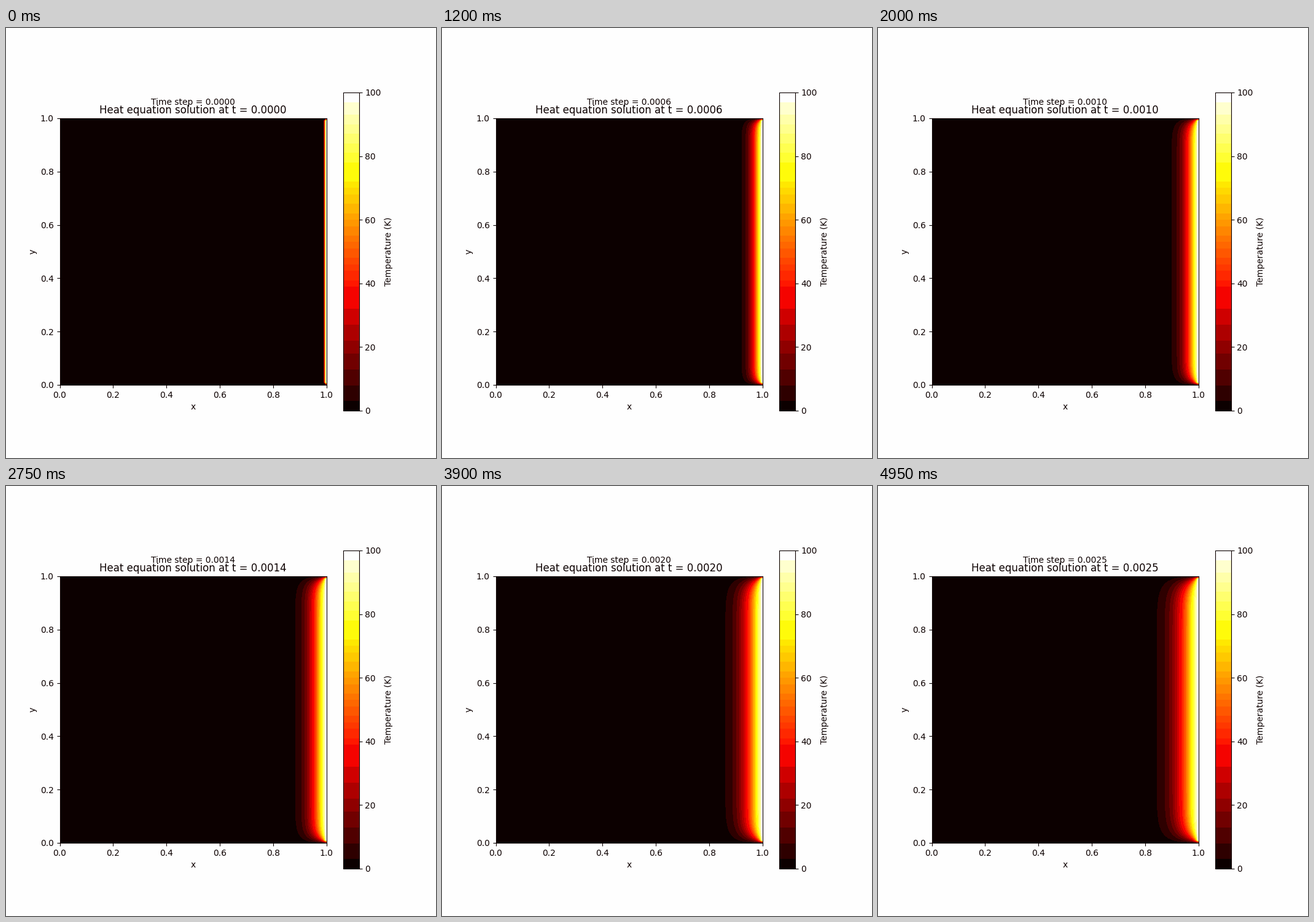
Recreate the animation shown at these times as a matplotlib script. Size 700 by 700 pixels, loop 5 s.

```python
import numpy as np
import matplotlib.pyplot as plt
from matplotlib.animation import FuncAnimation
from matplotlib.colors import BoundaryNorm, ListedColormap

FRAMES, INTERVAL = 100, 50
POINTS = 100
INK = (12 / 255, 0, 0)
PAPER = (254 / 255,) * 3

plt.rcParams.update({
    "font.family": "DejaVu Sans",
    "text.color": INK,
    "axes.labelcolor": INK,
    "axes.edgecolor": INK,
    "xtick.color": INK,
    "ytick.color": INK,
    "figure.facecolor": PAPER,
    "savefig.facecolor": PAPER,
    "axes.facecolor": PAPER,
})


def hot_bands():
    """Group one-kelvin steps of the hot map into coarse colour bands."""
    steps = (np.arange(100) + 0.5) / 100
    rgb = np.rint(plt.get_cmap("hot")(steps)[:, :3] * 255)
    bins = rgb // (32, 16, 32)
    cuts = np.flatnonzero(np.any(np.diff(bins, axis=0) != 0, axis=1)) + 1
    colors = [np.floor(g.mean(axis=0)) / 255 for g in np.split(rgb, cuts)]
    colors[0], colors[-1] = INK, PAPER
    return np.r_[0, cuts, 100], ListedColormap(colors)


def solve(dx, dt):
    """Explicit heat equation: right edge at 100 K, other edges at 0 K."""
    u = np.zeros((POINTS, POINTS))
    u[1:-1, -1] = 100
    states = [u]
    for _ in range(FRAMES - 1):
        new = u.copy()
        new[1:-1, 1:-1] += dt / dx**2 * (
            u[2:, 1:-1] + u[:-2, 1:-1] + u[1:-1, 2:] + u[1:-1, :-2]
            - 4 * u[1:-1, 1:-1])
        states.append(new)
        u = new
    return states


grid = np.linspace(0, 1, POINTS)
dx = grid[1]
dt = dx**2 / 4
states = solve(dx, dt)
levels, cmap = hot_bands()
norm = BoundaryNorm(levels, cmap.N)

fig, ax = plt.subplots(figsize=(7, 7), dpi=100)
fig.subplots_adjust(top=0.85)


def draw_field(n):
    return ax.contourf(grid, grid, states[n], levels=levels, cmap=cmap, norm=norm)


field = draw_field(0)
bar = fig.colorbar(field, ax=ax, spacing="proportional", ticks=range(0, 101, 20))
bar.minorticks_off()
bar.set_label("Temperature (K)")
ax.set_aspect("equal")
ax.set_xlabel("x")
ax.set_ylabel("y")
title = ax.set_title("")
note = ax.text(0.5, 1.05, "", transform=ax.transAxes, ha="center")


def update(n):
    global field
    field.remove()
    field = draw_field(n)
    title.set_text(f"Heat equation solution at t = {n * dt:.4f}")
    note.set_text(f"Time step = {n * dt:.4f}")
    return field, title, note


anim = FuncAnimation(fig, update, frames=FRAMES, interval=INTERVAL, repeat=True)
plt.show()
```
